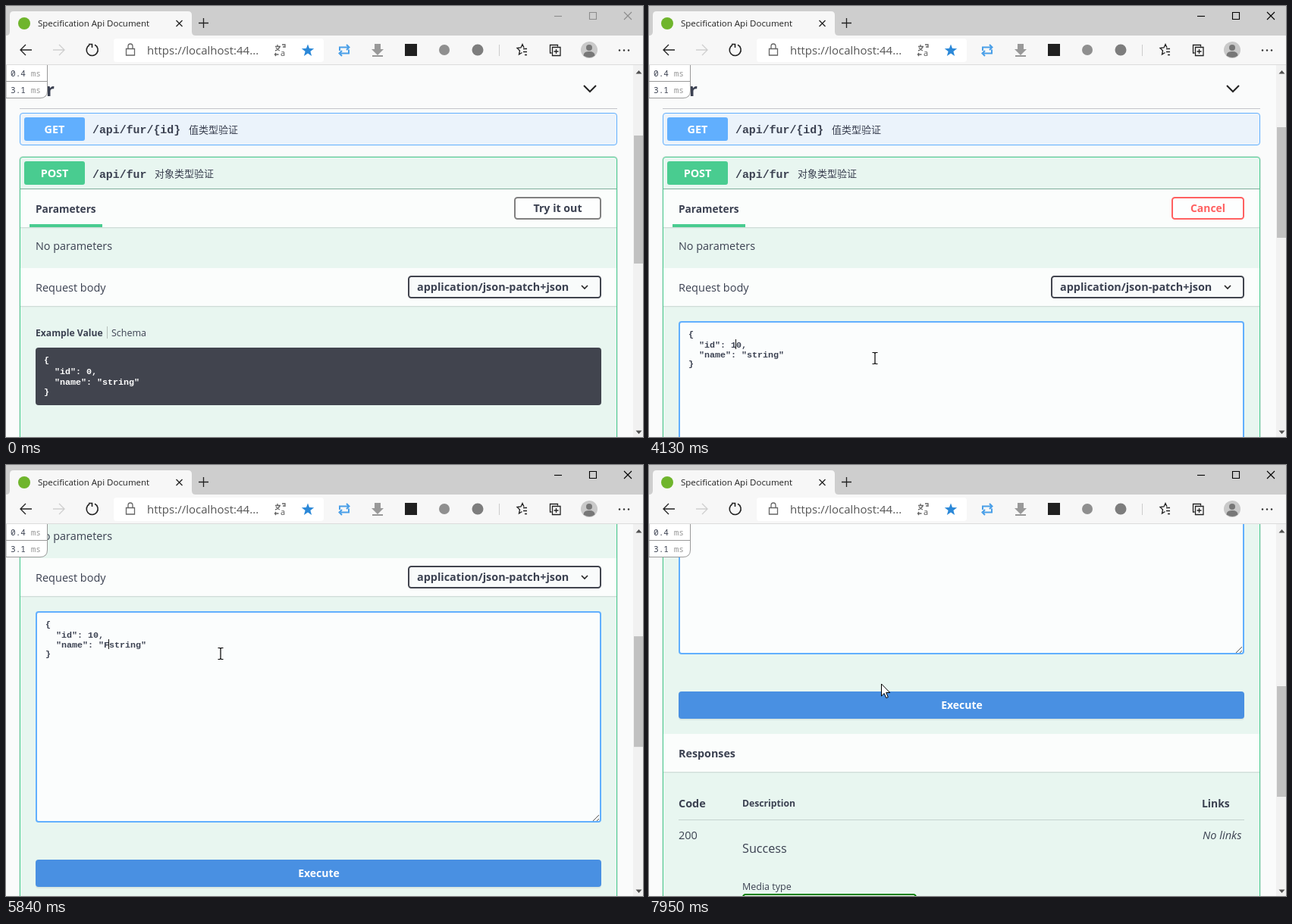
Write an HTML page that moves like this. It is 840 px wide and 569 px high and loops after 8000 ms.

```html
<!DOCTYPE html>
<html lang="en">
<head>
<meta charset="utf-8">
<title>API form</title>
<style>
html, body { margin: 0; width: 100%; height: 100%; overflow: hidden; background: #fafafa; }
svg { display: block; width: 840px; height: 569px; }
text { font-family: "Open Sans", "Noto Sans", sans-serif; fill: #3b4151; white-space: pre; }
.b { font-weight: 700; }
.code { font-family: "Liberation Mono", "Noto Sans Mono", monospace; font-weight: 700; }
.cjk { font-family: "Noto Sans CJK SC", "Noto Sans CJK", sans-serif; }
.mono { font-family: "Noto Sans Mono", "DejaVu Sans Mono", monospace; }
.line { fill: none; stroke: #222; stroke-width: 1.3; }
</style>
</head>
<body>
<svg id="stage" viewBox="0 0 840 569" xmlns="http://www.w3.org/2000/svg"></svg>
<script>
const LOOP = 8000, BLINK = 530, HALO = 75;
const ACTIVATE = 1330, OPEN = 1420, FOCUS = 2580;

const rect = (x, y, w, h, fill, extra = '') =>
  `<rect x="${x}" y="${y}" width="${w}" height="${h}" fill="${fill}" ${extra}/>`;
const text = (x, y, size, str, cls = '', extra = '') =>
  `<text x="${x}" y="${y}" font-size="${size}" class="${cls}" ${extra}>${str}</text>`;
const path = (d, extra = '') => `<path d="${d}" class="line" ${extra}/>`;
const white = 'style="fill:#fff"';
const mid = 'text-anchor="middle"';

const codeLines = (x, ys, lines, id, extra = '') =>
  lines.map((s, i) => text(x, ys[i], 11.67, s, 'code', `id="${id}${i}" ${extra}`)).join('');

const sectionHead = (y, h) =>
  rect(19, y, 786, h, '#fff', 'opacity=".82"') +
  rect(19, y + h, 786, 1, '#000', 'opacity=".1"') +
  rect(19, y + h + 1, 786, 1, '#000', 'opacity=".03"');

const method = (y, color, name) =>
  rect(24, y, 80, 31, color, 'rx="3"') +
  text(64, y + 20.5, 14.4, name, 'b', `${mid} ${white}`);

function summary() {
  return text(64, 119, 24, 'Fur', 'b', 'text-anchor="end"') +
    path('M762 105l8 8l8-8', 'style="stroke-width:2"') +
    rect(18, 135, 788, 1, '#c3c5ca') +
    rect(18.5, 141.5, 787, 42, '#ebf3fb', 'rx="3.5" stroke="#61affe"') +
    method(147, '#61affe', 'GET') +
    text(114, 168, 14.9, '/api/fur/{id}', 'code') +
    text(241, 168, 13, '值类型验证', 'cjk');
}

function postBlock() {
  return rect(18.5, 199.5, 787, 1200, '#e8f6f0', 'rx="3.5" stroke="#000" stroke-opacity=".07" stroke-width="3"') +
    rect(18.5, 199.5, 787, 1200, '#e8f6f0', 'rx="3.5" stroke="#49cc90"') +
    method(205, '#49cc90', 'POST') +
    text(114, 226.5, 14.9, '/api/fur', 'code') +
    text(196, 226, 13, '对象类型验证', 'cjk') +
    rect(19, 241, 786, 1, '#7fae9b') +
    sectionHead(242, 50) +
    text(39, 273, 13.7, 'Parameters', 'b') +
    rect(31, 288, 96, 4, '#49cc90') +
    text(39, 322, 14.4, 'No parameters') +
    sectionHead(346, 50) +
    text(39, 377, 14.5, 'Request body') +
    rect(531, 358, 253, 28, '#000', 'rx="4" opacity=".18"') +
    rect(531, 357, 253, 28, '#f9fbfb', 'rx="3.5" stroke="#41444e" stroke-width="2"') +
    text(542, 376, 14.4, 'application/json-patch+json', 'b') +
    path('M759 369l4 4l4-4', 'style="stroke-width:1.6"');
}

function closedForm() {
  return `<g id="closed">
    ${rect(669, 251, 117, 32, 'none', 'id="hover" rx="5" stroke="#000" stroke-width="4" stroke-opacity=".14"')}
    ${rect(671, 253, 113, 28, '#fdfefe', 'rx="3.5" stroke="#808080" stroke-width="2"')}
    ${text(727.5, 272, 14.2, 'Try it out', 'b', mid)}
    ${text(39, 436, 12.15, 'Example Value', 'b')}
    ${rect(133, 423, 1, 16, '#b5beba')}
    ${text(139, 436, 12.5, 'Schema')}
    ${rect(39, 451, 746, 76, '#41444e', 'rx="4"')}
    ${codeLines(50, [471, 485.5, 499.5, 513], ['{', '  "id": 0,', '  "name": "string"', '}'], 'sample', white)}
  </g>`;
}

function openForm() {
  return `<g id="open">
    ${rect(690, 253, 94, 28, '#fdfefe', 'rx="3.5" stroke="#ff6060" stroke-width="2"')}
    ${text(737, 272, 13.9, 'Cancel', 'b', `${mid} style="fill:#ff6060"`)}
    ${rect(40, 417, 744, 277, '#fbfdfd', 'id="area" rx="3"')}
    ${path('M774 693l8-8M779 693l3-3', 'style="stroke:#555;stroke-width:1"')}
    ${codeLines(52, [437, 450.5, 464, 476], ['{', '', '', '}'], 'body')}
    ${rect(0, 0, 1, 13, '#111', 'id="caret"')}
    ${rect(39, 746, 746, 36, '#000', 'rx="4" opacity=".06"')}
    ${rect(39, 744, 746, 36, '#4990e2', 'rx="4"')}
    ${text(412.5, 767, 14, 'Execute', 'b', `${mid} ${white}`)}
    ${sectionHead(800, 50)}
    ${text(39, 831, 14.3, 'Responses', 'b')}
    ${text(39, 897, 14.4, 'Code', 'b')}
    ${text(123, 896, 12.2, 'Description', 'b')}
    ${text(729, 897, 13.9, 'Links', 'b')}
    ${rect(39, 913, 746, 1, '#c5d3cf')}
    ${text(39, 939, 14.5, '200')}
    ${text(730, 939, 14.6, 'No links', '', 'font-style="italic"')}
    ${text(123, 957, 16.2, 'Success')}
    ${text(123, 1006, 12.5, 'Media type')}
    ${rect(124, 1012, 228, 28, '#f9fbfb', 'rx="3.5" stroke="#008000" stroke-width="2"')}
  </g>`;
}

function overlay() {
  const timing = (y, n) => text(6, y, 11.1, `${n} <tspan fill="#999">ms</tspan>`, 'mono');
  return rect(827, 78, 13, 491, '#f1f1f1') +
    rect(828, 171, 12, 169, '#c1c1c1', 'id="thumb"') +
    '<path d="M830.5 89.5l4-4.5l4 4.5zM830.5 560.5l4 4.5l4-4.5z" fill="#505050"/>' +
    '<path d="M0 77.5H54.5V112q0 9.5-9.5 9.5H0z" fill="#fff" stroke="#999"/>' +
    rect(0, 99, 54, 1, '#999') + timing(93, '0.4') + timing(115, '3.1');
}

const starPath = (cx, cy, r) => 'M' + Array.from({ length: 10 }, (_, i) => {
  const a = i * Math.PI / 5 - Math.PI / 2, d = i % 2 ? r * .42 : r;
  return `${(cx + d * Math.cos(a)).toFixed(1)} ${(cy + d * Math.sin(a)).toFixed(1)}`;
}).join('L') + 'z';

function browser() {
  const gray = 'style="stroke:#666"';
  return rect(0, 0, 840, 39, '#cecece') +
    '<path d="M0 39q5 0 5-5V12q0-5 5-5H240q5 0 5 5V34q0 5 5 5z" fill="#f7f7f7"/>' +
    rect(0, 39, 840, 39, '#f7f7f7') + rect(0, 77, 840, 1, '#dcdcdc') +
    '<circle cx="24" cy="23" r="8" fill="#6fb52c"/>' +
    text(42, 27, 11.5, 'Specification Api Document', '', 'style="fill:#222"') +
    path('M224.5 19l8 8m0-8l-8 8') + path('M254 22.5h13M260.5 16v13') +
    `<g id="window">${['M723 13.5h10', 'M769.5 8.5h9v9h-9z', 'M815 8l10 10m0-10l-10 10']
      .map(d => `<path d="${d}" fill="none" stroke-width="1.1"/>`).join('')}</g>` +
    path('M34 58H19m7-7l-7 7l7 7') +
    path('M62 58H77m-7-7l7 7l-7 7', 'style="stroke:#cfcfcf"') +
    path('M110 51.5A7.5 7.5 0 1 0 117 51.3M109 50.5h4.5v4.5', 'style="stroke-width:1.6"') +
    rect(142, 43, 277, 31, '#fff', 'rx="4"') +
    path('M158.5 56.5h11v8.5h-11zM161 56v-2.5a3 3.5 0 0 1 6 0V56', gray) +
    text(186, 64, 15, 'https://localhost:44...', '', 'style="fill:#555"') +
    path('M355 53.5h7m-4-2.5v2m3 1q-2 4-6 5m1-4q2 3 5 4M364 51h4v4m-3-1h3M356 62l-1.5 2l1.5 2m-1.5-2h5', gray) +
    text(362, 66, 11, 'a', '', 'style="fill:#555"') +
    `<path d="${starPath(398, 59, 8.6)}" fill="#2b88d8"/>` +
    path('M440 59v-4.500h11m-2-3.500l3.500 3.500l-3.500 3.500M452 57.500v5h-11m2 3.500l-3.500-3.500l3.500-3.500', 'style="stroke:#4a9fe8;stroke-width:2"') +
    '<path d="M486 50h8v7h4l-8 8l-8-8h4zM483 65h14v2h-14z" fill="#999"/>' +
    rect(526, 50, 16, 16, '#202020') +
    '<circle cx="578" cy="58" r="7" fill="#8f8f8f"/><circle cx="622" cy="58" r="7.5" fill="#7d7d7d"/>' +
    rect(650, 51, 1, 15, '#ccc') +
    path('M683 55l-2-4.500l-2 4.500l-5 .5l3.500 3.500l-1 5l4-2.500M682 56.500h5M682 60.500h5M684 64.500h3') +
    path('M719.5 62h-2V51.500h10v2M720.500 54.500h10.500v11h-10.500zM725.500 57v6m-3-3h6') +
    '<circle cx="769" cy="58" r="11" fill="#c9c9c9"/><circle cx="769" cy="55" r="4" fill="#777"/>' +
    '<path d="M761.500 65.500q0-5.500 7.500-5.500t7.500 5.500q-7 5-15 0z" fill="#777"/>' +
    [809, 815, 821].map(x => `<circle cx="${x}" cy="58.500" r="1.200" fill="#333"/>`).join('');
}

function pointer() {
  return `<g id="pointer"><circle id="halo" r="15" fill="#ffe600" opacity=".7"/>
    <path id="arrow" d="M.5 0V16l3.700-3.500l2.600 6l2.500-1l-2.600-6h5z" fill="#fff" stroke="#000"/>
    <path id="beam" d="M-3.500-7.500h2.500l1 1l1-1h2.500M0-6.500V6.500M-3.500 7.500h2.500l1-1l1 1h2.500" fill="none" stroke="#000" stroke-width="1.200"/>
    <path id="hand" d="M-1.500 14V0q0-2 1.500-2t1.500 2V7q3-1.500 3.500 .5q3-1 3.500 1q3-.5 3 2V16q0 3-2 5V23.500H.5V21q-2-2-4-6.500q-2.500-3-1-4t3 1.500M1.500 7v4M5 7.500v4M8.500 8.500v3" fill="#fff" stroke="#000"/>
  </g>`;
}

document.getElementById('stage').innerHTML =
  rect(0, 0, 840, 569, '#fafbfb') +
  `<g id="page">${summary()}${postBlock()}${closedForm()}${openForm()}</g>` +
  overlay() + browser() + pointer();

const el = id => document.getElementById(id);
const show = (id, on) => el(id).setAttribute('display', on ? 'inline' : 'none');
const attrs = (id, o) => Object.entries(o).forEach(([k, v]) => el(id).setAttribute(k, v));

// time, x, y of the pointer tip
const route = [
  [130, 110, 556], [300, 200, 475], [500, 400, 345], [680, 600, 228], [780, 680, 203],
  [920, 705, 236], [1000, 727, 258], [1160, 743, 269], [1500, 743, 269], [1650, 640, 310],
  [1850, 320, 405], [2000, 160, 445], [2100, 117, 449], [2180, 115, 449], [2430, 105, 449],
  [2640, 105, 449], [2720, 116, 448], [2950, 113, 452], [3110, 108, 456], [3270, 108, 456],
  [3360, 109, 450], [3830, 109, 450], [4100, 298, 465], [4230, 298, 465], [4600, 167, 226],
  [4830, 140, 225], [5070, 127, 233], [5290, 127, 233], [5580, 300, 247], [5800, 283, 249],
  [7780, 283, 249], [7950, 306, 289]
];
const clicks = [1330, 2580, 3510, 5220];
// time, line, caret column
const edits = [[2580, 1, 7], [3510, 1, 8], [3830, 1, 9], [5220, 2, 11], [5710, 2, 12], [6620, 2, 13], [6790, 2, 14]];
const scrolls = [[4190, 4590, 223], [7480, 7860, 222]];

const clamp01 = v => Math.min(1, Math.max(0, v));
const ease = p => p * p * (3 - 2 * p);

function along(t) {
  const i = route.findIndex(k => k[0] > t);
  if (i < 0) return route[route.length - 1].slice(1);
  const a = route[Math.max(0, i - 1)], b = route[i];
  const p = clamp01((t - a[0]) / (b[0] - a[0] || 1));
  return [a[1] + (b[1] - a[1]) * p, a[2] + (b[2] - a[2]) * p];
}

function pointerKind(x, y, opened) {
  const inside = (x0, y0, x1, y1) => x >= x0 && x <= x1 && y >= y0 && y <= y1;
  if (inside(opened ? 689 : 670, 252, 785, 282)) return 'hand';
  if (opened && inside(39, 744, 785, 780)) return 'hand';
  return opened && inside(39, 416, 785, 695) ? 'beam' : 'arrow';
}

function render(t) {
  const opened = t >= OPEN, focused = t >= FOCUS;
  const scroll = scrolls.reduce((s, [a, b, d]) => s + d * ease(clamp01((t - a) / (b - a))), 0);

  attrs('page', { transform: `translate(0 ${-Math.round(scroll)})` });
  attrs('thumb', opened ? { y: 160 + scroll * .2966, height: 146 } : { y: 171, height: 169 });
  attrs('window', { stroke: t < ACTIVATE ? '#8c8c8c' : '#000' });
  show('closed', !opened);
  show('open', opened);
  attrs('area', focused ? { stroke: '#61affe', 'stroke-width': 2 } : { stroke: '#d9d9d9', 'stroke-width': 1 });

  const typed = [5710, 6620, 6790].filter(k => t >= k).length;
  el('body1').textContent = `  "id": ${t >= 3830 ? '10' : '0'},`;
  el('body2').textContent = `  "name": "${'Fur'.slice(0, typed)}string"`;

  const edit = edits.filter(e => t >= e[0]).pop();
  show('caret', edit && Math.floor((t - edit[0]) / BLINK) % 2 === 0);
  if (edit) attrs('caret', { x: Math.round(51.4 + edit[2] * 7), y: 427 + 13 * edit[1] });

  const [x, y] = along(t);
  const kind = pointerKind(x, y + scroll, opened);
  show('pointer', t >= route[0][0]);
  attrs('pointer', { transform: `translate(${Math.round(x)} ${Math.round(y)})` });
  ['arrow', 'beam', 'hand'].forEach(k => show(k, k === kind));
  show('halo', clicks.some(c => t >= c && t < c + HALO));
  show('hover', !opened && kind === 'hand');
}

const start = performance.now();
function tick() {
  render((performance.now() - start) % LOOP);
  requestAnimationFrame(tick);
}
render(0);
requestAnimationFrame(tick);
</script>
</body>
</html>
```
